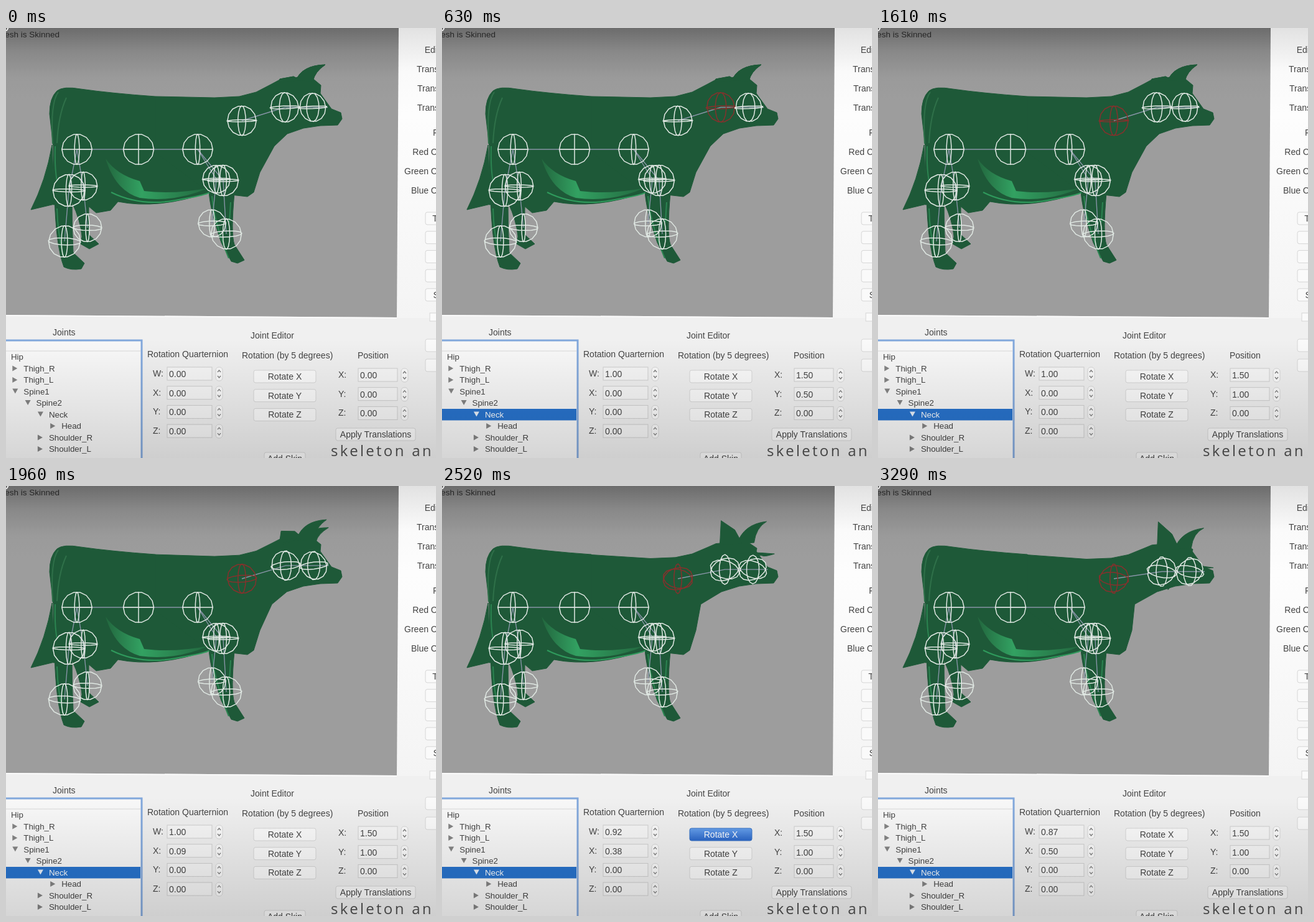
Recreate the animation shown at these times as an HTML page. Size 691 by 691 pixels, loop 3360 ms.

```html
<!DOCTYPE html>
<html lang="en">
<head>
<meta charset="utf-8">
<title>Joint editor</title>
<style>
  html, body { margin: 0; width: 100%; height: 100%; overflow: hidden; background: #eee; }
  svg { display: block; width: 100%; height: 100%; }
  text { font: 14px "Liberation Sans", Arial, sans-serif; fill: #444; white-space: pre; }
  .tree text { font-size: 13.3px; }
  .ball { fill: none; stroke: #dfe7e2; stroke-width: 1.5; stroke-linejoin: round; }
  .ball.on { stroke: #86302c; }
  .bone { fill: none; stroke: #8794a6; stroke-width: 1.4; }
  .skin { fill: #1e5938; stroke: #1e5938; stroke-width: 1; stroke-linejoin: round; }
  .field { fill: #f6f6f6; stroke: #cfcfcf; }
  .button { fill: #fafafa; stroke: #d6d6d6; }
  .button.on { fill: url(#press); stroke: #3a74c4; }
  .button.on + text, text.on { fill: #fff; }
  .arrow { fill: #858585; }
  .arrow.on { fill: #e8f0fa; }
  .step { fill: none; stroke: #777; stroke-width: 1.2; }
</style>
</head>
<body>
<svg viewBox="0 0 691 691" preserveAspectRatio="none">
  <defs>
    <linearGradient id="view" x2="0" y2="1">
      <stop offset="0" stop-color="#6c6c6c"/><stop offset=".08" stop-color="#888"/>
      <stop offset=".17" stop-color="#9a9a9a"/><stop offset=".25" stop-color="#9d9d9d"/>
    </linearGradient>
    <linearGradient id="side" x2="0" y2="1">
      <stop offset="0" stop-color="#e2e2e2"/><stop offset=".15" stop-color="#fafafa"/>
      <stop offset=".3" stop-color="#fdfdfd"/><stop offset="1" stop-color="#f4f4f4"/>
    </linearGradient>
    <linearGradient id="shade" x2="0" y2="1">
      <stop offset="0" stop-opacity="0"/><stop offset="1" stop-opacity=".14"/>
    </linearGradient>
    <linearGradient id="press" x2="0" y2="1">
      <stop offset="0" stop-color="#66a0ec"/><stop offset="1" stop-color="#2b66c8"/>
    </linearGradient>
    <linearGradient id="shine">
      <stop offset="0" stop-color="#23693f"/><stop offset=".35" stop-color="#36ae69"/>
      <stop offset="1" stop-color="#23693f"/>
    </linearGradient>
  </defs>

  <rect y="455" width="691" height="236" fill="#f0f0f0"/>
  <path d="M625 0H691V466H625Z" fill="url(#side)"/>
  <path d="M0 0H631L628 465L0 461Z" fill="url(#view)"/>
  <path d="M0 462L628 466" stroke="#fafafa" stroke-width="2"/>

  <!-- body, tail and legs -->
  <g class="skin">
    <path d="M240 110Q170 105 120 98Q92 93 82 101Q70 112 70 138L76 190V284L125 280L145 297L168 293L180 279
      Q245 292 326 264L340 200Z"/>
    <path d="M74 188Q64 245 40 292L78 283Z"/>
    <path d="M78 270Q80 350 93 384Q105 390 121 387L126 378L108 361Q106 320 106 280Z"/>
    <path d="M106 280Q120 310 122 335L120 347L134 355L149 347L133 332V280Z"/>
    <path d="M326 260Q327 290 346 345L362 375L372 378L383 373L367 348Q361 330 367 265Z"/>
  </g>
  <g id="head" class="skin"></g>
  <g fill="none" stroke="#2c8451" stroke-width="2">
    <path d="M84 103Q71 120 75 186M97 112Q84 140 82 185" stroke="#2f7049"/>
    <path d="M79 190Q78 225 82 246M82 290Q83 330 92 366"/>
    <path d="M331 270Q335 315 358 370M361 280L359 312"/>
    <path d="M169 264Q215 287 272 277T326 264" stroke="#2f9a5c"/>
  </g>
  <path d="M160 210Q178 236 215 246L222 262Q270 268 326 257Q270 281 215 273Q176 262 160 210Z" fill="url(#shine)" opacity=".85"/>
  <g id="rig"></g>

  <text x="86" y="15" text-anchor="end" style="font-size:13.5px;fill:#252525">Mesh is Skinned</text>
  <text x="-2" y="1" style="font-size:20px;fill:#fff">y</text>
  <g id="ui"></g>
  <rect y="500" width="691" height="191" fill="url(#shade)"/>
  <text x="522" y="687.5" style="font:24px 'Open Sans','Noto Sans',sans-serif;letter-spacing:3.3px;fill:#444">skeleton an</text>
</svg>
<script>
const LOOP = 3360, TICK = 70, ROW = 30.7;
const $ = id => document.getElementById(id);
const { sin, cos, abs, exp, floor, round, min, max, PI } = Math;
const clamp = v => min(1, max(0, v));

function add(parent, tag, attrs = {}, text = "") {
  const el = document.createElementNS("http://www.w3.org/2000/svg", tag);
  for (const k in attrs) el.setAttribute(k, attrs[k]);
  el.textContent = text;
  return parent.appendChild(el);
}
const ui = $("ui"), head = $("head"), rig = $("rig");
const label = (x, y, s, anchor = "start", g = ui) => add(g, "text", { x, y, "text-anchor": anchor }, s);
const box = (cls, x, y, width, height, rx = 3) => add(ui, "rect", { class: cls, x, y, width, height, rx });
const lit = (el, on) => el.classList.toggle("on", on);

// Interface
function spinField(name, nameX, x, y, width) {
  label(nameX, y + 4, name + ":");
  box("field", x, y - 11, width, 21, 0);
  const sx = x + width + 12;
  box("button", sx - 6, y - 11, 11, 22, 5);
  add(ui, "path", { class: "step", d: `M${sx - 3} ${y - 3}l2.5 -3l2.5 3m-5 6l2.5 3l2.5 -3` });
  return label(x + 3, y + 5, "0.00");
}
function button(s, x, y, w) {
  const b = box("button", x, y, w, 20);
  label(x + w / 2, y + 15, s, "middle");
  return b;
}

label(75, 494, "Joints");
label(393, 499, "Joint Editor");
label(227, 529, "Rotation Quarternion");
label(379, 531, "Rotation (by 5 degrees)");
label(565, 531, "Position");
const quat = [..."WXYZ"].map((n, i) => spinField(n, 236, 259, 556 + i * ROW, 72));
const pos = [..."XYZ"].map((n, i) => spinField(n, 534, 566, 558 + i * ROW, 63));
const [rotateX] = [..."XYZ"].map((n, i) => button("Rotate " + n, 398, 550 + i * ROW, 100));
button("Apply Translations", 530, 643, 128);
button("Add Skin", 415, 682, 66);

["Edit Mesh", "Translate X:", "Translate Y:", "Translate Z:"].forEach((s, i) => label(735, 40 + 31 * i, s, "end"));
["Far Clip", "Red Channel", "Green Channel", "Blue Channel"].forEach((s, i) => label(735, 173 + 31 * i, s, "end"));
["Toggle", "", "", "", "Select"].forEach((s, i) => button(s, 674, 296 + i * ROW, s ? 64 : 60));
box("button", 681, 458, 50, 13, 0);
button("", 674, 500, 60);
button("", 674, 532, 60);

// Joint tree: name, depth, marker
const tree = add(ui, "g", { class: "tree" });
add(tree, "rect", { x: -5, y: 502, width: 223, height: 200, fill: "#f8f8f8", stroke: "#82a8dc", "stroke-width": 3 });
add(tree, "path", { d: "M0 519H216", stroke: "#d8d8d8" });
const bar = add(tree, "rect", { width: 216, height: 18.5, fill: "#2873cd" });
const rows = {};
["Hip 0", "Thigh_R 1 >", "Thigh_L 1 >", "Spine1 1 v", "Spine2 2 v", "Neck 3 v", "Head 4 >", "Shoulder_R 3 >", "Shoulder_L 3 >"]
  .forEach((line, i) => {
    const [name, depth, mark] = line.split(" ");
    const x = 8 + depth * 20.3, y = 533 + i * 18.5;
    const shape = mark === "v" ? "l9 0l-4.5 8z" : "l8 4.5l-8 4.5z";
    const text = label(x, y, name, "start", tree);
    const arrow = add(tree, "path", { class: "arrow", d: mark ? `M${x - 18} ${y - 9}${shape}` : "" });
    rows[name] = { y, parts: [text, arrow] };
  });

// Twisting the neck turns horns and ears about its axis; side is 1 near, -1 far
const AXIS = 137;
function spin([x, y, z], side, turn) {
  const reach = side > 0 ? 1.1 : -1, drift = side > 0 ? 30 : 12;
  return [x + drift * sin(turn), AXIS + (y - AXIS) * cos(turn) + reach * z * sin(turn)];
}
const horn = [[466, 84, 10], [476, 60, 30], [513, 59, 35], [496, 70, 32], [493, 86, 14]];
const ear = [[438, 88, 10], [440, 82, 60], [462, 78, 35], [474, 84, 10]];
const neckTop = [[240, 110], [335, 112], [375, 110], [402, 103], [427, 90], [440, 83], [470, 79], [494, 82], [506, 92]];
const jaw = [[505, 105], [523, 130], [538, 136], [540, 146], [533, 156], [505, 157], [478, 161],
  [452, 170], [431, 190], [408, 232], [398, 264], [388, 271], [326, 264], [240, 200]];

// The crest sinks towards the axis while the throat is drawn back
const sink = (k, [x, y]) => [x, y + (AXIS - y) * .22 * k * clamp((x - 230) / 90)];
const pull = (k, [x, y]) => [x - 19 * k * exp(-(((y - 188) / 14) ** 2)) * (x > 300), y];

const skull = add(head, "path");
const horns = [1, -1].map(side => ({ side, el: add(head, "path") }));
const ears = [1, -1].map(side => ({ side, el: add(head, "path") }));

// Rig
const limbs = [
  { r: 24.5, at: [[114, 195], [213, 195], [308, 195]] },
  { r: 26, from: [114, 195], at: [[101, 261], [94, 343]] },
  { r: 23, from: [114, 195], at: [[124, 254], [131, 321]] },
  { r: 25, from: [308, 195], at: [[349, 245], [354, 331]] },
  { r: 22.5, from: [308, 195], at: [[338, 243], [331, 314]] }
];
const line = pts => "M" + pts.join("L");
for (const { from, at } of limbs) add(rig, "path", { class: "bone", d: line(from ? [from, ...at] : at) });
const neckBone = add(rig, "path", { class: "bone" });

// Three wire rings, one around each axis, seen slightly from the view centre
function wireBall([x, y], r, turn) {
  const yaw = (x - 213) * .0016, tilt = turn + abs(y - 195) * .0015;
  let d = "";
  for (let axis = 0; axis < 3; axis++) {
    const pts = [];
    for (let i = 0; i < 14; i++) {
      const a = i / 14 * 2 * PI, p = [0, 0, 0];
      p[(axis + 1) % 3] = r * cos(a);
      p[(axis + 2) % 3] = r * sin(a);
      const [px, py, pz] = p;
      const sy = py * cos(tilt) - pz * sin(tilt), sz = py * sin(tilt) + pz * cos(tilt);
      pts.push([x + px * cos(yaw) + sz * sin(yaw), y + sy]);
    }
    d += line(pts) + "Z";
  }
  return d;
}
const ball = () => add(rig, "path", { class: "ball" });
for (const { r, at } of limbs) for (const p of at) ball().setAttribute("d", wireBall(p, r, 0));
const [neckBall, headBall, noseBall] = [ball(), ball(), ball()];

function draw(t) {
  const clicks = 12 * clamp((t - 1800) / 1000);
  const angle = 5 * round(clicks), turn = angle * PI / 180;
  const k = sin(turn) / sin(PI / 3);
  const row = t < 140 ? "" : t < 630 ? "Head" : "Neck";
  const active = t < 210 ? "" : t < 700 ? "Head" : "Neck";

  skull.setAttribute("d", line([...neckTop.map(p => sink(k, p)), ...jaw.map(p => pull(k, p))]) + "Z");
  for (const { side, el } of horns) {
    const [a, b, tip, c, e] = horn.map(p => spin(p, side, turn));
    el.setAttribute("d", `M${a}Q${b} ${tip}Q${c} ${e}Z`);
  }
  for (const { side, el } of ears) el.setAttribute("d", line(ear.map(p => spin(p, side, turn))) + "Z");

  const neck = [379, 149];
  const [skullJoint, nose, tip] = [448, 493, 517].map(x => [x + 8 * k, 127.5 + 10 * k * k]);
  neckBone.setAttribute("d", line([neck, skullJoint, nose, tip]));
  neckBall.setAttribute("d", wireBall(neck, 24, turn));
  headBall.setAttribute("d", wireBall(skullJoint, 24, turn));
  noseBall.setAttribute("d", wireBall(nose, 23, turn));
  lit(neckBall, active === "Neck");
  lit(headBall, active === "Head");

  bar.setAttribute("visibility", row ? "visible" : "hidden");
  if (row) bar.setAttribute("y", rows[row].y - 13.5);
  for (const name in rows) rows[name].parts.forEach(el => lit(el, name === row));

  const show = (el, v) => { el.textContent = v.toFixed(2); };
  show(quat[0], active ? cos(turn / 2) : 0);
  show(quat[1], sin(turn / 2));
  show(pos[0], active ? 1.5 : 0);
  show(pos[1], active === "Neck" ? 1 : active ? .5 : 0);
  const phase = clicks % 1;
  lit(rotateX, phase > .5 && phase < .8);
}

function loop() {
  draw(floor(performance.now() % LOOP / TICK) * TICK);
  requestAnimationFrame(loop);
}
loop();
</script>
</body>
</html>
```
